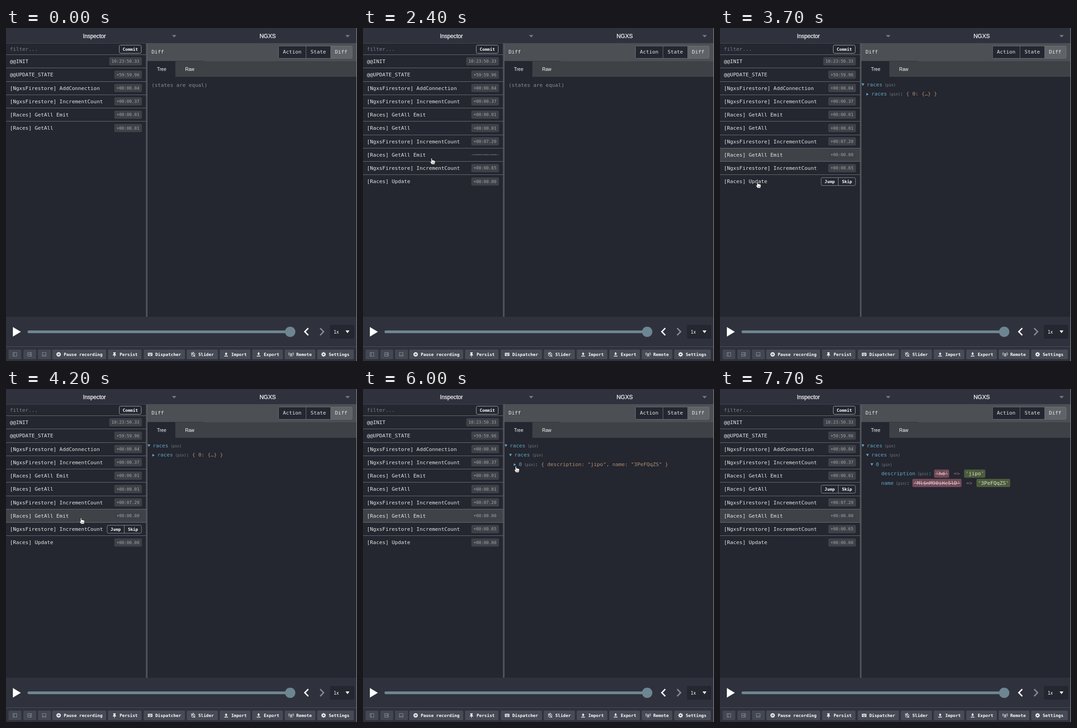
Write an HTML page that moves like this. It is 767 px wide and 730 px high and loops after 7.8 s.

```html
<!DOCTYPE html>
<html lang="en">
<head>
<meta charset="utf-8">
<title>State inspector</title>
<style>
html, body { margin: 0; width: 100%; height: 100%; overflow: hidden; background: #242630; }
svg { display: block; width: 767px; height: 730px; }
text { font-family: "DejaVu Sans Mono", monospace; }
.sans { font-family: "Liberation Sans", Arial, sans-serif; }
.bold { font-weight: bold; }
.strike { text-decoration: line-through; }
</style>
</head>
<body>
<svg id="stage" viewBox="0 0 767 730"><g id="base"></g><g id="live"></g></svg>
<script>
const LOOP = 7800, STEP = 100, SIZE = 11.25, CHAR = SIZE * 0.602;
const BG = '#242630', BAR = '#2f323d', LINE = '#6c6f76', BLUE = '#62a9c6', GREY = '#84878d', TAN = '#b08f70';

const rect = (x, y, w, h, fill, more = '') =>
  `<rect x="${x}" y="${y}" width="${w}" height="${h}" fill="${fill}" ${more}/>`;
const path = (d, fill, more = '') => `<path d="${d}" fill="${fill}" ${more}/>`;
const stroke = (d, color, width = 1) => path(d, 'none', `stroke="${color}" stroke-width="${width}"`);
const text = (x, y, s, fill = '#e6e7e8', size = SIZE, cls = '', more = '') =>
  `<text x="${x}" y="${y}" fill="${fill}" font-size="${size}" class="${cls}" ${more}>${s.replace(/>/g, '&gt;')}</text>`;
const bold = (x, y, s, size = 9.2) => text(x, y, s, '#fff', size, 'bold');

// Footer icons, drawn around 0,0
const W = '#f0f1f2', DARK = '#464b55';
const tray = path('M-4 3h8v1.6h-8z', W);
const spokes = [0, 45, 90, 135].map(a => rect(-1.1, -5, 2.2, 10, W, `transform="rotate(${a})"`)).join('');
const icons = [
  `<circle r="4.8" fill="${W}"/>` + rect(-2, -2, 1.4, 4, DARK) + rect(.6, -2, 1.4, 4, DARK),
  path('M-2.8 -4.5h5.6v1.2h-.8v3l1.6 1.6v1h-3v3l-.6 .8l-.6 -.8v-3h-3v-1l1.6 -1.6v-3h-.8z', W),
  rect(-5, -3.4, 10, 7, W, 'rx="1"') + stroke('M-3.7 -1.5h7.4M-3.7 .3h7.4', DARK, 1.1) +
    stroke('M-2.2 2h4.4', DARK, 1) + stroke('M-2 -2.4v3.4M0 -2.4v3.4M2 -2.4v3.4', W, .6),
  `<circle cy=".6" r="3.7" fill="none" stroke="${W}" stroke-width="1.1"/>` +
    stroke('M-1.4 -4.7h2.8M-4.6 -3.8L4.4 5', W, 1.1) + stroke('M0 .6V-1.6', W, 1),
  tray + path('M-1.2 1.8v-2.6h-2L0 -4.4l3.2 3.6h-2v2.6z', W),
  tray + path('M-1.2 -4.4v2.6h-2L0 1.8l3.2 -3.6h-2v-2.6z', W),
  `<circle cy="-1" r="1.3" fill="${W}"/>` + stroke('M0 -1L-2.2 5M0 -1L2.2 5M-1.5 3h3', W, .9) +
    stroke('M-2.4 1.2a3 3 0 0 1 0 -4.4M2.4 1.2a3 3 0 0 0 0 -4.4M-4 2.5a5 5 0 0 1 0 -7M4 2.5a5 5 0 0 0 0 -7', W, .9),
  spokes + `<circle r="3.6" fill="${W}"/><circle r="1.6" fill="${DARK}"/>`
];
const buttons = [
  ['Pause recording', 101, 219], ['Persist', 223, 296], ['Dispatcher', 301, 391], ['Slider', 395, 463],
  ['Import', 467, 534], ['Export', 538, 605], ['Remote', 609, 676], ['Settings', 680, 760]
];
const splits = ['M-1.5 -4v8', 'M1.5 -4v8M-4 0h8', 'M-4 1.5h8'];

function drawBase() {
  const title = (x, s, size) => text(x, 21.7, s, '#eeeff0', size, 'sans', 'stroke="#eeeff0" stroke-width=".35"');
  const caret = x => path(`M${x} 15.5h10l-5 5z`, '#777b84');
  let s = rect(0, 0, 767, 730, BG) + rect(0, 0, 767, 34, BAR) +
    title(168, 'Inspector', 12.2) + title(554, 'NGXS', 12.6) + caret(362.5) + caret(741.5);

  // Left column
  s += stroke('M0 33.5h767', '#464952') + text(8.5, 50, 'filter...', '#7e8187') +
    rect(247.5, 37.5, 48, 18, BG, 'rx="3" stroke="#a9abb0"') + bold(255, 50.2, 'Commit');

  // Right column
  s += rect(309, 34, 457, 39, '#4c4f54') + rect(309, 73, 457, 34, '#3e4145') + rect(309, 73, 61, 34, BG) +
    stroke('M309 72.5h123', '#33363c') + text(318, 56.3, 'Diff') +
    rect(595.5, 39.5, 161, 27, BG, 'rx="2"') + rect(709, 39.5, 47, 27, '#606368') +
    rect(595.5, 39.5, 161, 27, 'none', 'rx="2" stroke="#6d7077"') + stroke('M655.5 39v28M709.5 39v28', '#6d7077') +
    text(605, 56.3, 'Action') + text(665.5, 56.3, 'State') + text(718.8, 56.3, 'Diff') +
    text(330, 94, 'Tree', '#fff', 10, 'sans') + text(391.5, 94, 'Raw', '#fff', 10, 'sans') +
    stroke('M306.5 34v600M308.5 34v600', '#73767c');

  // Player
  s += rect(0, 633, 767, 97, BAR) + path('M15 655.5L32.5 666L15 676.5z', '#fff') +
    rect(47, 663, 580, 6, '#6d8691', 'rx="3"') + '<circle cx="621" cy="666" r="11.3" fill="#6d8691"/>' +
    stroke('M660.5 658L653 665.8L660.5 673.5', '#fff', 3) + stroke('M686.5 658L694 665.8L686.5 673.5', '#85888e', 3) +
    rect(708, 651, 53, 30, BG, 'rx="2"') + text(716, 669.8, '1x', '#fff', 9.6) +
    path('M742 663h8.5l-4.25 6z', '#fff');

  // Footer
  s += stroke('M0 698.5h767', '#4b4f58');
  splits.forEach((d, i) => {
    s += rect([5.5, 38, 70][i], 705, 28, 21, '#424751', 'rx="2"') +
      `<g transform="translate(${19.5 + 32 * i} 715.5)">` + rect(-4, -4, 8, 8, 'none', 'stroke="#858991"') +
      stroke(d, '#858991') + '</g>';
  });
  buttons.forEach(([label, a, b], i) => {
    s += rect(a, 705, b - a, 21, DARK, 'rx="2"') +
      `<g transform="translate(${a + 14} 715.5)">${icons[i]}</g>` + bold(a + 25.2, 719, label, 9.4);
  });
  return s + rect(765.5, 0, 1.5, 730, '#75787d');
}

// Action log: label, time chip, appearance time, hover intervals
const rows = [
  ['@@INIT', '10:23:50.33', 0],
  ['@@UPDATE_STATE', '+59:59.96', 0],
  ['[NgxsFirestore] AddConnection', '+00:00.04', 0],
  ['[NgxsFirestore] IncrementCount', '+00:00.37', 0],
  ['[Races] GetAll Emit', '+00:00.01', 0],
  ['[Races] GetAll', '+00:00.01', 0, [7400, LOOP]],
  ['[NgxsFirestore] IncrementCount', '+00:07.20', 1300],
  ['[Races] GetAll Emit', '+00:00.00', 1300, [2310, 3110], [4210, 4620]],
  ['[NgxsFirestore] IncrementCount', '+00:00.65', 1950, [3950, 4210]],
  ['[Races] Update', '+00:00.00', 1950, [3210, 3950]]
];
const SELECT = 2600, OPEN_RACES = 5200, OPEN_ITEM = 6200, FLIP = 200;
const clamp = v => Math.min(1, Math.max(0, v));

function drawRow([label, time, born, ...hovers], i, t) {
  if (t < born) return '';
  const y = 73 + i * 29.27, top = Math.round(y - 15) + .5;
  const turn = hovers.reduce((p, [a, b]) => p + clamp((t - a) / FLIP) - clamp((t - b) / FLIP), 0);
  const scale = Math.cos(turn * Math.PI), w = time.length * 5.54 + 10.5;
  const side = scale > 0
    ? rect(297 - w, -9, w, 18, '#3e4147', 'rx="3"') + text(302 - w, 3.3, time, '#a3a6aa', 9.2)
    : rect(221, -8.5, 75, 17.5, BG, 'rx="3" stroke="#8d9096"') + stroke('M258.5 -8.5v17.5', '#8d9096') +
      bold(228.6, 3.6, 'Jump') + bold(266.4, 3.6, 'Skip');
  return (i == 7 && t >= SELECT ? rect(0, top, 306, 29, '#3f4247') : '') +
    stroke(`M0 ${top}h306`, LINE) + text(8.5, y + 4, label) +
    `<g transform="translate(0 ${y}) scale(1 ${Math.abs(scale)})">${side}</g>`;
}

function node(line, x, key, arrow, value) {
  const y = 127.6 + line * 20.6, a = x - 11.5, pin = x + key.length * CHAR + 5;
  const marks = { open: `M${a} ${y - 6}h6l-3 5.5z`, shut: `M${a + .5} ${y - 6}v6l5 -3z` };
  return (arrow ? path(marks[arrow], BLUE) : '') + text(x, y, key, BLUE) + text(pin, y, '(pin)', '#7d8187', 8) +
    (value ? text(pin + 23.5, y, ':', BLUE) + (value.map ? change(pin + 36, y, value) : text(pin + 37, y, value, TAN)) : '');
}

function change(x, y, [before, after]) {
  const chip = (x, s, bg, fg, cls) =>
    rect(x, y - 13, s.length * CHAR + 6, 18, bg, 'rx="3"') + text(x + 3.2, y, s, fg, SIZE, cls);
  const next = x + before.length * CHAR + 16;
  return chip(x, before, '#704a57', '#dcc6cc', 'strike') + text(next, y, '=>', '#917380') +
    chip(next + 22.5, after, '#4c5b3c', '#d8dfc9', '');
}

function drawDiff(t) {
  if (t < 1300 || (t >= 1950 && t < SELECT)) return text(318, 128.5, '(states are equal)', '#8b8e93');
  const root = node(0, 320.8, 'races', 'open');
  if (t < OPEN_RACES) return root + node(1, 330.8, 'races', 'shut', '{ 0: {…} }');
  const list = root + node(1, 330.8, 'races', 'open');
  if (t < OPEN_ITEM) return list + node(2, 340.4, '0', 'shut', '{ description: "jipo", name: "3PeFQqZS" }');
  return list + node(2, 340.4, '0', 'open') +
    node(3, 352.2, 'description', '', ["'hd'", "'jipo'"]) +
    node(4, 352.2, 'name', '', ["'Ml$nM90iHc5lD'", "'3PeFQqZS'"]);
}

// Pointer stops: time, x, y of the fingertip
const stops = [
  [2250, 190, 300], [2400, 150, 285], [3000, 150, 283], [3200, 79, 337], [3800, 82, 337], [4000, 116, 312],
  [4200, 164, 282], [4450, 200, 272], [4800, 321, 143], [5700, 321, 143], [6000, 334, 169], [6200, 334, 169],
  [6450, 345, 238], [6750, 345, 238], [7200, 180, 215]
];
const HAND = 'M-1.2 .8Q0 -.8 1.2 .8V5Q2.8 3.8 3.6 5.3Q5 4.4 5.8 5.9Q7.6 5.2 7.8 7V10L6.6 14H.2L-3.6 8.6Q-3.8 6.6 -1.2 8.6z';

function drawPointer(t) {
  const i = stops.findIndex(s => s[0] > t);
  if (i < 1) return '';
  const [t0, x0, y0] = stops[i - 1], [t1, x1, y1] = stops[i];
  const p = (t - t0) / (t1 - t0), e = p * p * (3 - 2 * p);
  return `<g transform="translate(${x0 + (x1 - x0) * e} ${y0 + (y1 - y0) * e})">` +
    path(HAND, '#fff', 'stroke="#111" stroke-width=".9"') +
    stroke('M1.6 9.5v2.6M3.6 9.5v2.6M5.6 9.5v2.6', '#222', .7) + '</g>';
}

const live = document.getElementById('live');
document.getElementById('base').innerHTML = drawBase();
let shown = -1;

function frame() {
  const t = Math.floor(performance.now() % LOOP / STEP) * STEP;
  if (t !== shown) {
    live.innerHTML = rows.map((r, i) => drawRow(r, i, t)).join('') + drawDiff(t) + drawPointer(t);
    shown = t;
  }
  requestAnimationFrame(frame);
}
frame();
</script>
</body>
</html>
```
